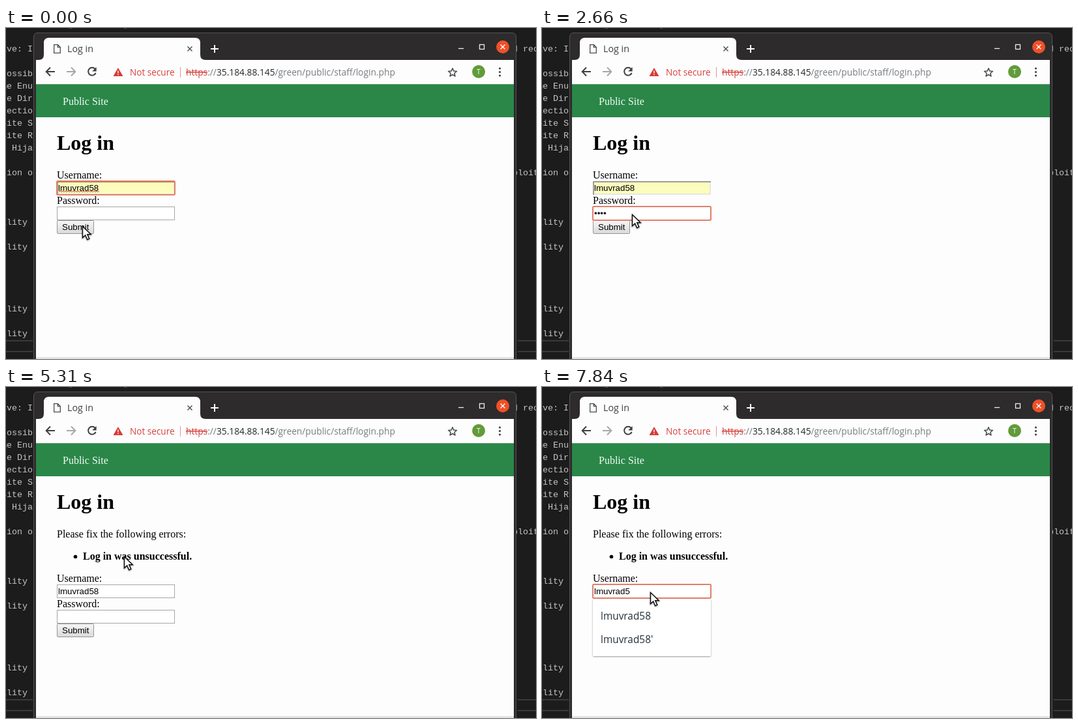
Recreate the animation shown at these times as an HTML page. Size 813 by 508 pixels, loop 8 s.

```html
<!DOCTYPE html>
<html lang="en">
<head>
<meta charset="utf-8">
<title>Log in</title>
<style>
  html, body { margin: 0; width: 100%; height: 100%; overflow: hidden; background: #1c1c1c; }
  svg { display: block; width: 813px; height: 508px; }
  text { white-space: pre; }
  .mono { font: 13.33px "Liberation Mono", monospace; fill: #c4c4c4; }
  .ui { font-family: "Open Sans", "Noto Sans", sans-serif; }
  .page { font: 16px "Liberation Serif", serif; }
  .field { font: 13.33px "Liberation Sans", sans-serif; }
  .line { fill: none; stroke: #3c4043; stroke-width: 2; }
</style>
</head>
<body>
<svg viewBox="0 0 813 508">
  <defs>
    <linearGradient id="face" x2="0" y2="1">
      <stop offset="0" stop-color="#f6f6f6"/><stop offset="1" stop-color="#dadada"/>
    </linearGradient>
    <filter id="soft" x="-20%" y="-20%" width="150%" height="150%">
      <feDropShadow dx="0" dy="1" stdDeviation="1" flood-opacity=".4"/>
    </filter>
  </defs>

  <rect width="813" height="508" fill="#1c1c1c"/>
  <g id="terminal" class="mono"></g>
  <path d="M0 480H41M0 496.500H41M785 480H813M785 496.500H813" stroke="#444" stroke-width="1.500"/>
  <path d="M97 0H101M181 0H185" stroke="#887c62"/>

  <!-- window frame -->
  <path d="M42.500 508V14Q42.500 7.500 49 7.500H776Q782.500 7.500 782.500 14V508" fill="#2d2b2c" stroke="#555354"/>
  <path d="M50 49Q58 49 58 41V23Q58 15 66 15H290Q298 15 298 23V41Q298 49 306 49Z" fill="#fdfdfd"/>
  <rect x="46" y="49" width="733" height="459" fill="#fdfdfd"/>
  <g id="docIcon" fill="none" stroke="#4a4d51" stroke-width="1.300">
    <path d="M73.700 25.700H79.500L83.300 29.500V38.300H73.700ZM79.300 25.700V29.700H83.300"/>
  </g>
  <path id="spinner" d="M78 26A6 6 0 0 1 84 32" fill="none" stroke="#777b80" stroke-width="2"/>
  <text class="ui" x="94" y="37" font-size="14.300" fill="#3c4043">Log in</text>
  <path d="M278.500 28.500L285.500 35.500M285.500 28.500L278.500 35.500" stroke="#55585c" stroke-width="1.600"/>
  <path d="M314 32H326M320 26V38" stroke="#fff" stroke-width="2"/>
  <path d="M694 31.500H702" stroke="#eee" stroke-width="1.300"/>
  <rect x="726.500" y="25.500" width="7" height="7" fill="none" stroke="#eee" stroke-width="1.300"/>
  <circle cx="762" cy="29" r="10" fill="#ee5128"/>
  <path d="M758.500 25.500L765.500 32.500M765.500 25.500L758.500 32.500" stroke="#fff" stroke-width="1.300"/>

  <!-- toolbar -->
  <path class="line" d="M75 67H62M68 60.500L61.700 67L68 73.500"/>
  <path class="line" d="M93 67H106M100 60.500L106.300 67L100 73.500" style="stroke:#a5a7aa"/>
  <g id="reload">
    <path class="line" d="M136.700 62.800A6 6 0 1 0 137.700 69"/>
    <path d="M138.700 60V66.500H132.200Z" fill="#3c4043"/>
  </g>
  <path id="stop" class="line" d="M126.700 61.700L137.300 72.300M137.300 61.700L126.700 72.300"/>
  <path d="M172 61L179.500 74H164.500Z" fill="#d93a35"/>
  <path d="M172 65.500V69.500M172 70.800V72.300" stroke="#fff" stroke-width="1.400"/>
  <text class="ui" x="190" y="73" font-size="13.600" fill="#d5403c">Not secure</text>
  <path d="M267.500 60V76" stroke="#d99a98"/>
  <text class="ui" x="276" y="73" font-size="13.750" fill="#777b80"><tspan fill="#d5403c" text-decoration="line-through">https</tspan>://<tspan fill="#25282b">35.184.88.145</tspan>/green/public/staff/login.php</text>
  <path id="star" fill="none" stroke="#4a4d51" stroke-width="1.500" stroke-linejoin="round"/>
  <circle cx="725" cy="67" r="10" fill="#619b3a"/>
  <text class="ui" x="725" y="71" font-size="10.500" fill="#fff" text-anchor="middle">T</text>
  <g fill="#3c4043"><circle cx="757.500" cy="62" r="1.600"/><circle cx="757.500" cy="67.500" r="1.600"/><circle cx="757.500" cy="73" r="1.600"/></g>

  <!-- page -->
  <rect x="46" y="86" width="733" height="51" fill="#2a8748"/>
  <path d="M46 86.500H779" stroke="#5c9d72"/>
  <rect x="46" y="505" width="733" height="3" fill="#e4e4e4"/>
  <g class="page">
    <text x="87" y="118" fill="#f4faf5">Public Site</text>
    <text x="78" y="187" style="font-size:32px;font-weight:bold">Log in</text>
    <g id="errors">
      <text x="78" y="231">Please fix the following errors:</text>
      <circle cx="106.500" cy="260.500" r="2.800"/>
      <text x="118" y="265" font-weight="bold">Log in was unsuccessful.</text>
    </g>
    <g id="form">
      <text x="78" y="231">Username:</text>
      <rect id="userBox" x="78.500" y="235.500" width="180" height="20" fill="#fff" stroke="#a6a6a6"/>
      <g id="inset" fill="none" stroke-width="2">
        <path d="M79 256V236H259" stroke="#9c9c98"/>
        <path d="M80 255H258V237" stroke="#e6e6df"/>
      </g>
      <text x="78" y="270">Password:</text>
      <rect x="78.500" y="274.500" width="180" height="20" fill="#fff" stroke="#a6a6a6"/>
      <text id="dots" class="field" x="80" y="289"></text>
      <rect x="78.500" y="295.500" width="56" height="20" rx="1" fill="url(#face)" stroke="#949494"/>
      <text class="field" x="86" y="310">Submit</text>
      <rect id="ring" x="78" y="235" width="181" height="21" rx="1.500" fill="none" stroke="#e0806a" stroke-width="2"/>
      <path id="ringTop" d="M79 236.500H258" stroke="#a08058"/>
      <text id="user" class="field" x="80" y="250"></text>
      <path id="squiggle" fill="none" stroke="#d8503c"/>
      <rect id="caret" width="1" height="15"/>
    </g>
  </g>
  <g id="menu" class="ui" font-size="15.400" fill="#22303a">
    <rect x="78" y="325" width="181" height="88" rx="2" fill="#fff" filter="url(#soft)"/>
    <text id="pick1" x="90" y="357"></text>
    <text id="pick2" x="90" y="393"></text>
  </g>
  <path id="mouse" d="M.5 .5V17.800L4.700 14L7.700 20.800L10.800 19.400L7.800 12.800H13.200Z" fill="#fff" stroke="#111" stroke-width="1.500" filter="url(#soft)"/>
</svg>
<script>
const LOOP = 8000, STEP = 145, USER = "lmuvrad58";
const el = id => document.getElementById(id);
const show = (id, on) => { el(id).style.display = on ? "" : "none"; };
const set = (id, attrs) => { for (const k in attrs) el(id).setAttribute(k, attrs[k]); };

// baseline and visible end of each terminal line
const lines = [[36, "ive: I"], [74, "possib"], [93, "me Enu"], [112, "re Dir"],
  [131, "lectio"], [150, "Site S"], [169, "Site R"], [188, "n Hija"], [226, "tion o"],
  [302, "ility"], [340, "ility"], [435, "ility"], [473, "ility"]];
const cell = (x, y, s) => `<text x="${x}" y="${y}">${s}</text>`;
el("terminal").innerHTML = lines.map(([y, s]) => cell(-7, y, s)).join("")
  + cell(777, 36, "d rec") + cell(777, 226, "ploit");

const starPoints = Array.from({ length: 10 }, (_, i) => {
  const r = i % 2 ? 3 : 6.8, a = i * Math.PI / 5 - Math.PI / 2;
  return (685 + r * Math.cos(a)).toFixed(1) + " " + (68.5 + r * Math.sin(a)).toFixed(1);
});
set("star", { d: "M" + starPoints.join("L") + "Z" });
set("squiggle", { d: "M81 252" + Array.from({ length: 31 }, (_, i) => `l2 ${i % 2 ? 2 : -2}`).join("") });
el("pick1").textContent = USER;
el("pick2").textContent = USER + "'";

// pointer: time, x, y (held until the next entry)
const path = [[0, 117, 304], [440, 121, 297], [585, 134, 276], [730, 148, 253],
  [875, 156, 240], [1020, 157, 238], [1320, 151, 266], [1460, 145, 281],
  [2660, 138, 286], [2805, 124, 299], [2950, 112, 308], [3100, 107, 311],
  [4720, 168, 289], [5020, 174, 276], [5165, 179, 265], [5310, 181, 260],
  [5610, 180, 257], [5757, 168, 268], [5904, 149, 288], [6050, 133, 306],
  [6200, 126, 314], [6350, 128, 315], [6500, 135, 315], [6640, 152, 315], [6790, 166, 315]];
const typed = [[0, 0], [1910, 1], [2060, 3], [2210, 4], [3980, 0]];
const at = (table, t) => table.reduce((a, b) => b[0] <= t ? b : a);

function draw(t) {
  const within = (a, b) => t >= a && t < b;
  const failed = t >= 3980, loading = within(3400, 4270);
  const userFocus = t < 1610 || t >= 6790, passFocus = within(1610, 3400);
  const dots = at(typed, t)[1];
  const [, x, y] = at(path, t);

  set("mouse", { transform: `translate(${x} ${y})` });
  show("docIcon", !loading);
  show("reload", !loading);
  show("stop", loading);
  show("spinner", within(3545, 4270));
  set("spinner", { transform: `rotate(${-60 * Math.floor((t - 3400) / STEP)} 78 32)` });

  show("errors", failed);
  set("form", { transform: `translate(0 ${failed ? 68 : 0})` });
  set("userBox", { fill: failed ? "#fff" : "#fcfcbc" });
  show("inset", !failed);
  show("ring", userFocus || passFocus);
  set("ring", { y: passFocus ? 274 : 235 });
  show("ringTop", t < 1610);
  show("squiggle", t < 1610 || within(6790, 7840));
  el("user").textContent = t < 7840 ? USER : USER.slice(0, -1);
  el("dots").textContent = "•".repeat(dots);

  show("caret", within(1610, 2660) || within(6790, 7540));
  set("caret", passFocus ? { x: 80 + Math.round(4.7 * dots), y: 277 } : { x: 143, y: 238 });
  show("menu", t >= 6940);
}

const start = performance.now();
function tick() {
  draw((performance.now() - start) % LOOP);
  requestAnimationFrame(tick);
}
tick();
</script>
</body>
</html>
```
